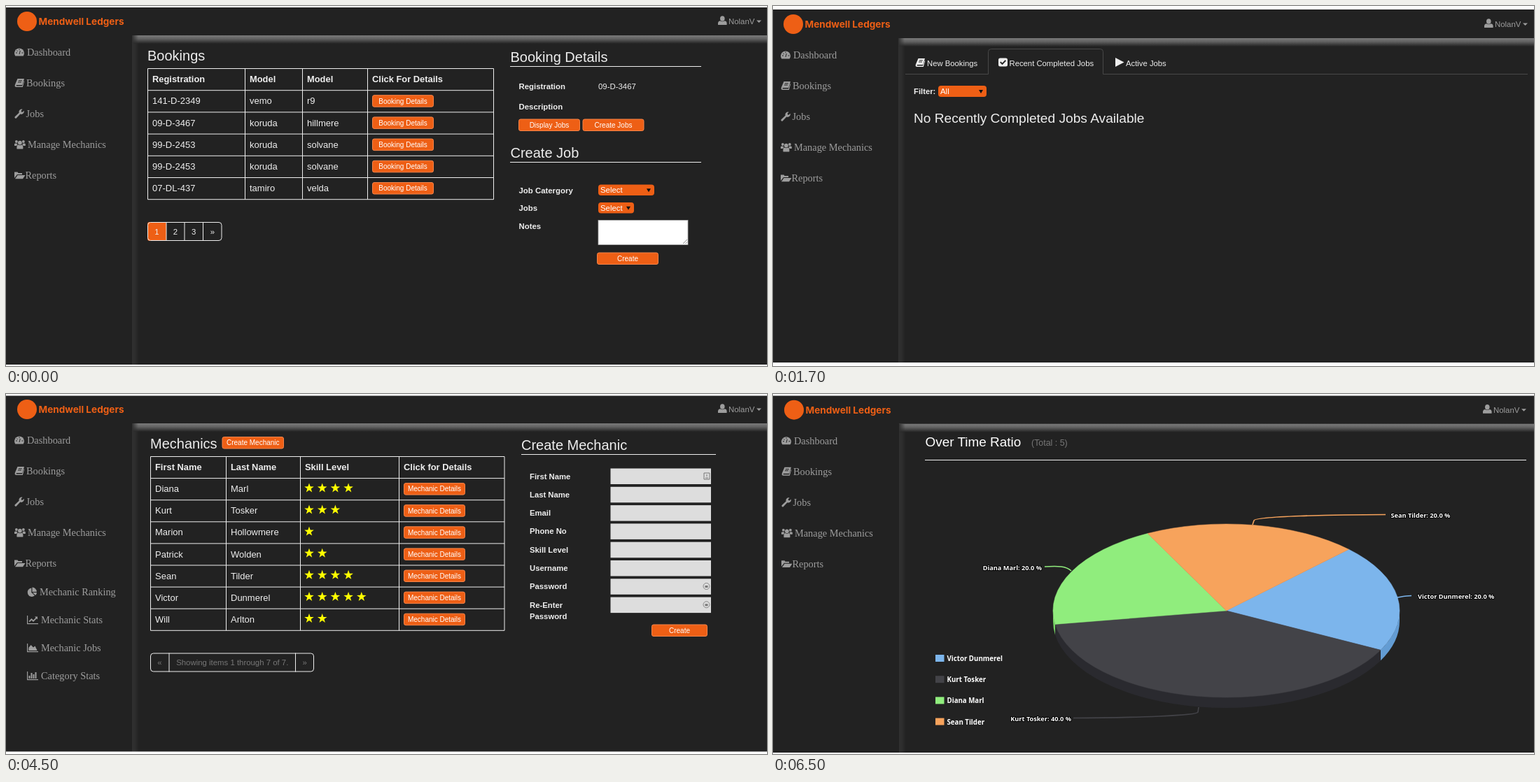
Write an HTML page that moves like this. It is 1087 by 515 pixels and loops after 8 s.

```html
<!DOCTYPE html>
<html lang="en">
<head>
<meta charset="utf-8">
<title>Workshop dashboard</title>
<style>
  html, body { margin: 0; width: 100%; height: 100%; overflow: hidden; background: #222; }
  svg { display: block; width: 1087px; height: 515px; }
  text { font-family: "Liberation Sans", Arial, sans-serif; white-space: pre; }
  .nav { font-family: "Liberation Serif", Times, serif; }
  .brand { font-family: Inter, "Open Sans", sans-serif; font-weight: 700; }
  .chart { font-family: "Open Sans", "Noto Sans", sans-serif; font-weight: 700; }
  .halo { paint-order: stroke; stroke: #000; stroke-width: 2px; stroke-linejoin: round; }
  .b { font-weight: 700; }
</style>
</head>
<body>
<svg id="stage" viewBox="0 0 1087 515" xmlns="http://www.w3.org/2000/svg"></svg>
<script>
const BG = '#222', ORANGE = '#ee5f15', INK = '#eee', GREY = '#9d9d9d', MUTED = '#777';
const stage = document.getElementById('stage');

// y is the middle of the capitals
const text = (x, y, s, size = 13, { fill = INK, cls = '', anchor = 'start' } = {}) =>
  `<text x="${x}" y="${(y + size * 0.36).toFixed(2)}" font-size="${size}" fill="${fill}" class="${cls}" text-anchor="${anchor}">${s}</text>`;
const bold = (x, y, s, size = 12.9) => text(x, y, s, size, { cls: 'b' });
const rect = (x, y, w, h, fill, extra = '') =>
  `<rect x="${x}" y="${y}" width="${w}" height="${h}" fill="${fill}" ${extra}/>`;
const path = (d, fill = 'none', extra = '') => `<path d="${d}" fill="${fill}" ${extra}/>`;
const lines = (d, color = INK, width = 1) => path(d, 'none', `stroke="${color}" stroke-width="${width}"`);
const repeat = (n, fn) => Array.from({ length: n }, (_, i) => fn(i)).join('');

const button = (x, y, w, label, h = 17.5) =>
  rect(x + .5, y + .5, w - 1, h - 1, ORANGE, 'rx="2.5" stroke="#f5854a"') +
  text(x + w / 2, y + h / 2, label, 10, { fill: '#fff', anchor: 'middle' });

const select = (x, y, w, label, h = 15.5) =>
  rect(x, y, w, h, ORANGE, 'rx="4"') +
  text(x + 3, y + h / 2, label, 11.4, { fill: '#fff' }) +
  path(`M${x + w - 11} ${y + h / 2 - 2}h6l-3 5z`, '#111');

// stops are the cell edges; active is the filled cell
function pager(y, h, stops, labels, active, muted = []) {
  const left = stops[0], right = stops[stops.length - 1];
  return (active < 0 ? '' : rect(stops[active], y, stops[active + 1] - stops[active], h, ORANGE, active ? '' : 'rx="3"')) +
    rect(left + .5, y + .5, right - left - 1, h - 1, 'none', `stroke="${INK}" rx="4"`) +
    lines(stops.slice(1, -1).map(x => `M${x} ${y}v${h}`).join('')) +
    labels.map((s, i) => text((stops[i] + stops[i + 1]) / 2, y + h / 2, s, 11.4,
      { anchor: 'middle', fill: muted.includes(i) ? MUTED : INK })).join('');
}

function grid(xs, top, pitch, rows) {
  const right = xs[xs.length - 1], bottom = top + pitch * rows;
  return lines(xs.map(x => `M${x} ${top}V${bottom}`).join('') +
    repeat(rows + 1, i => `M${xs[0]} ${top + pitch * i}H${right}`));
}

function star(cx, cy, r = 7.2) {
  const points = Array.from({ length: 10 }, (_, i) => {
    const a = i * Math.PI / 5, q = i % 2 ? r * .4 : r;
    return `${(cx + q * Math.sin(a)).toFixed(1)},${(cy - q * Math.cos(a)).toFixed(1)}`;
  });
  return `<polygon points="${points.join(' ')}" fill="#ff0"/>`;
}
const stars = (n, x, y, pitch) => repeat(n, i => star(x + i * pitch, y));

// Each icon: filled shape, then strokes cut out of it
const ICONS = {
  gauge: ['M1.3 12.5A7 7 0 1 1 12.7 12.5z', 'M7 10L8.3 5M2 8h2M10.5 8h2M3.3 4.7l1.4 1.2M7 2.5v1.6'],
  book: ['M4.5 1H14L11.2 10H3q-1.2 1 .2 1.6H11L13.7 4 14.3 4.6 11.8 13H3Q0 13 .8 9.8z', 'M5.8 3.8h5M5 6h5'],
  wrench: ['M.8 11.2L6.6 5.8A4 4 0 0 1 11.6 .8L9.6 2.8 10 4.4 11.6 4.8 13.7 2.8A4 4 0 0 1 8.4 7.6L3 13.3A1.5 1.5 0 0 1 .8 11.2z'],
  users: ['M5 4.6a2.9 2.9 0 1 1 5.8 0 2.9 2.9 0 1 1-5.8 0M3.5 13.5Q2.8 8 5.5 7.4 8 9 10.4 7.4 13 8 12.3 13.5zM1 3a1.9 1.9 0 1 1 3.8 0 1.9 1.9 0 1 1-3.8 0M11 3a1.9 1.9 0 1 1 3.8 0 1.9 1.9 0 1 1-3.8 0M0 9V6.3Q1 4.8 4.4 6L3.4 9zM15.8 9V6.3Q14.8 4.8 11.4 6l1 3z'],
  folder: ['M0 11V2.5H4.5L5.6 4H11V6H4zM4.6 7H15.5L12 12.3H1z'],
  user: ['M3 4a3.3 3.8 0 1 1 6.6 0 3.3 3.8 0 1 1-6.6 0M0 13V10Q.5 7.4 3 7.2 6.3 9.4 9.6 7.2 12.3 7.4 12.6 10V13z'],
  pie: ['M6.3 1.5V8L11 12.3A6.2 6.2 0 1 1 6.3 1.5zM7.5 .6A6.4 6.4 0 0 1 13.8 7H7.5zM8 8h6a6 6 0 0 1-1.8 4z'],
  trend: ['M0 1h1.2v11H16v1.2H0zM2.5 9L6.5 5 9 7.5 12.5 4 11 2.6H15V6.5L13.7 5.2 9 10 6.5 7.5 3.8 10.3z'],
  area: ['M0 1h1.2v11H16v1.2H0zM2.4 11V7L5.6 3 9 6.4 11.5 4.6 14.6 11z'],
  bars: ['M0 1h1.2v11H16v1.2H0zM2.5 7h2v4h-2zM5.5 3h2v8h-2zM8.5 5h2v6h-2zM11.5 2h2v9h-2z'],
  check: ['M2.5 1H10.5Q13 1 13 3.5V10.5Q13 13 10.5 13H2.5Q0 13 0 10.5V3.5Q0 1 2.5 1z', 'M2.8 6.6L5.5 9.4 10.3 4.4'],
  play: ['M0 .5L12.5 7 0 13.5z']
};
const icon = (name, x, y, fill = GREY) => {
  const [shape, cut] = ICONS[name];
  return `<g transform="translate(${x} ${y})">${path(shape, fill)}${cut ? lines(cut, BG, name === 'check' ? 2 : 1) : ''}</g>`;
};

const MENU = [
  ['gauge', 'Dashboard', 30], ['book', 'Bookings', 29], ['wrench', 'Jobs', 28.5],
  ['users', 'Manage Mechanics', 31], ['folder', 'Reports', 27.5]
];
const REPORTS = [['pie', 'Mechanic Ranking', 48], ['trend', 'Mechanic Stats', 50], ['area', 'Mechanic Jobs', 50], ['bars', 'Category Stats', 50]];
const navText = (x, y, s) => text(x, y, s, 14.35, { fill: GREY, cls: 'nav' });

// Header, menu and the lit edge of the content pane
function chrome({ dx = 0, dy = 0, userX = 1017, top, bottom, pitch = 44, reports = false }) {
  const paneX = 180 + dx, paneY = 42 + dy;
  return rect(0, 0, 1087, 515, BG) +
    rect(paneX, paneY, 10, 515, 'url(#side)') +
    rect(paneX, paneY, 1087, 12, 'url(#top)') +
    rect(paneX, paneY, 9, 12, 'url(#corner)') +
    `<g transform="translate(${dx} ${dy})">` +
    `<circle cx="30" cy="22" r="14" fill="${ORANGE}"/>` +
    text(46.5, 22, 'Mendwell Ledgers', 13.6, { fill: ORANGE, cls: 'brand' }) +
    MENU.map(([name, label, x], i) => icon(name, 12, 59 + i * pitch) + navText(x, 66 + i * pitch, label)).join('') +
    (reports ? REPORTS.map(([name, label, x], i) => icon(name, 30, 276 + i * 40) + navText(x, 283 + i * 40, label)).join('') : '') +
    '</g>' +
    icon('user', userX, 14 + dy) +
    text(userX + 15, 22 + dy, 'NolanV', 11.4, { fill: GREY }) +
    path(`M${userX + 55} ${20.5 + dy}h7l-3.5 3.6z`, GREY) +
    rect(0, 0, 1087, top, '#fff') + rect(0, bottom, 1087, 515 - bottom, '#fff');
}

const STAFF = [
  ['Diana', 'Marl', 4], ['Kurt', 'Tosker', 3], ['Marion', 'Hollowmere', 1], ['Patrick', 'Wolden', 2],
  ['Sean', 'Tilder', 4], ['Victor', 'Dunmerel', 5], ['Will', 'Arlton', 2]
];
const fullName = i => STAFF[i].slice(0, 2).join(' ');

function bookings() {
  const top = 89.5, pitch = 31.2;
  const rows = [['141-D-2349', 'vemo', 'r9'], ['09-D-3467', 'koruda', 'hillmere'], ['99-D-2453', 'koruda', 'solvane'],
    ['99-D-2453', 'koruda', 'solvane'], ['07-DL-437', 'tamiro', 'velda']];
  const cols = [209, 348, 430, 523];
  return chrome({ top: 2, bottom: 513 }) +
    text(202, 71, 'Bookings', 20) +
    grid([202.5, 341.5, 423.5, 516.5, 696.5], top, pitch, 6) +
    ['Registration', 'Model', 'Model', 'Click For Details'].map((s, i) => bold(cols[i], 104.5, s)).join('') +
    rows.map((row, r) => {
      const y = top + pitch * (r + 1);
      return row.map((s, i) => text(cols[i], y + 15, s)).join('') + button(523, y + 6.5, 88, 'Booking Details');
    }).join('') +
    pager(309, 27, [202, 229, 255, 281.5, 308.5], ['1', '2', '3', '»'], 0) +
    text(720.5, 73, 'Booking Details', 20) + text(720.5, 209.5, 'Create Job', 20) +
    lines('M720 86.5H993M720 223.5H993') +
    [['Registration', 115], ['Description', 143.5], ['Job Catergory', 263.5], ['Jobs', 289], ['Notes', 314.5]]
      .map(([s, y]) => bold(732.5, y, s, 11.4)).join('') +
    text(846, 115, '09-D-3467', 11.4) +
    button(732, 161.5, 88, 'Display Jobs') + button(823.5, 161.5, 88, 'Create Jobs') +
    select(846, 255.5, 80, 'Select') + select(846, 281, 51, 'Select') +
    rect(846, 306.5, 128, 35, '#fff', 'stroke="#aaa" stroke-width=".8"') +
    lines('M967 340l6-6M970.5 340l2.5-2.5', '#777', .8) +
    button(844, 352.5, 88, 'Create');
}

function completed() {
  return chrome({ dx: -1, dy: 4, userX: 1016, top: 5, bottom: 510 }) +
    lines('M189 97.5H307.5V65.5q0-4 4-4H467.5q4 0 4 4V97.5H1078', '#484848') +
    icon('book', 203, 74, INK) + text(220, 81.5, 'New Bookings', 11.3) +
    icon('check', 322, 73.5, INK) + text(337.5, 81.5, 'Recent Completed Jobs', 11.3) +
    icon('play', 489, 73.5, INK) + text(504, 81.5, 'Active Jobs', 11.3) +
    bold(201, 122, 'Filter:', 11.3) + select(236, 114, 69, 'All', 16) +
    text(201, 160, 'No Recently Completed Jobs Available', 19.15);
}

function jobs() {
  const top = 102, pitch = 31.5, cols = [222, 344.5, 439, 524];
  const rows = [['Fix Radiator', '09-D-3467', 4], ['Tyres', '09-D-3467', 2], ['Tyres', '05-DL-1784', 1], ['Tyres', '01-MN-3465', 1],
    ['Tyres', '01-MN-3465', 1], ['New Brake Pads', '07-CN-345', 2, '50'], ['Fix Radiator', '09-D-3467', 3, '22']];
  const roster = [5, 1, 3, 0, 2, 4, 6];
  const rosterY = [229, 260, 292, 323.5, 355, 404, 435.5];
  return chrome({ dx: 1.5, dy: -2, userX: 1014, top: 0, bottom: 515, pitch: 44.3 }) +
    rect(1086, 0, 1, 515, '#fff') +
    text(214, 78, 'Jobs List', 20.3) +
    bold(349, 77, 'Choose Jobs', 11.5) + select(432, 69, 108, 'All Jobs', 16) +
    grid([215.5, 338, 432.5, 517, 566.5], top, pitch, 8) +
    lines(`M682 ${top + pitch}V${top + 8 * pitch}` + repeat(8, i => `M566 ${top + pitch * (i + 1)}H682`)) +
    ['Jobs', 'Car Reg.', 'Difficutly', 'Time'].map((s, i) => bold(cols[i], 117.5, s, 13.1)).join('') +
    rows.map(([job, reg, level, time], r) => {
      const y = top + pitch * (r + 1);
      return text(222, y + 15.5, job) + text(344.5, y + 15.5, reg) +
        repeat(level, i => icon('wrench', 439.5 + i * 16.6, y + 7, '#a5a5a5')) +
        (time ? text(523.5, y + 15.5, time) : button(573, y + 6.5, 89, 'Add Mechanic', 18));
    }).join('') +
    pager(387, 24.5, [215, 246.5, 272.5, 298.5, 324, 350, 375.5, 401.5, 433.5],
      ['««', '«', '1', '2', '3', '4', '»', '»»'], 2, [0, 1]) +
    bold(752, 77, 'Filter', 11.5) + select(786, 69, 90, 'All Mechanics', 16) +
    text(719, 105, "Available mechanics for the job 'Tyres' on car 09-D-3467", 11.53) +
    text(719, 152, 'Mechanics', 20.2) +
    lines([182, 213.5, 245, 276, 307.5, 339.5, 389, 420.5].map(y => `M731 ${y}H1051`).join('')) +
    bold(737.5, 197.5, 'Mechanic', 13) + bold(853, 197.5, 'Skill Level', 13) +
    roster.map((who, i) => {
      const [first, last, skill] = STAFF[who].map(v => typeof v === 'string' ? v.toLowerCase() : v), y = rosterY[i];
      const name = who === 2 ? text(737.5, y, first) + text(737.5, y + 17.5, last)
        : text(737.5, y, `${first}\u00a0\u00a0\u00a0${last}`);
      return name + stars(skill, 858, y - 1, 19) + button(956, y - 9, 89, 'Assign');
    }).join('') +
    pager(484, 24.5, [731, 763, 789, 814.5, 840.5, 872], ['««', '«', '1', '»', '»»'], 2, [0, 1, 3, 4]);
}

function mechanics() {
  const top = 89.5, pitch = 31.1, cols = [213, 321, 427, 568];
  const labels = ['First Name', 'Last Name', 'Email', 'Phone No', 'Skill Level', 'Username', 'Password', 'Re-Enter'];
  return chrome({ top: 2.5, bottom: 511.5, reports: true }) +
    text(206, 71, 'Mechanics', 20) + button(308.5, 61, 88.5, 'Create Mechanic') +
    grid([206.5, 314.5, 420.5, 561.5, 712], top, pitch, 8) +
    ['First Name', 'Last Name', 'Skill Level', 'Click for Details'].map((s, i) => bold(cols[i], 104.5, s)).join('') +
    STAFF.map(([first, last, skill], r) => {
      const y = top + pitch * (r + 1);
      return text(213, y + 15, first) + text(321, y + 15, last) +
        stars(skill, 433, y + 14, 18.7) + button(568, y + 6.5, 88, 'Mechanic Details');
    }).join('') +
    pager(370.5, 27, [206, 233, 413.5, 440], ['«', 'Showing items 1 through 7 of 7.', '»'], -1, [0, 1, 2]) +
    text(736, 72.5, 'Create Mechanic', 20) + lines('M736 86.5H1014') +
    labels.map((s, i) => bold(748, 117.5 + i * 26.3, s, 11.3) + rect(863.5, 106.5 + i * 26.3, 143.5, 22.5, '#ddd')).join('') +
    bold(748, 317.5, 'Password', 11.3) +
    lines('M997 113h8v9h-8zM999 120h4M1001 115v3', '#777') +
    [275, 301.3].map(y => `<circle cx="1000.5" cy="${y}" r="4.5" fill="none" stroke="#888"/>` + rect(998.5, y - 1, 4, 3, '#777')).join('') +
    button(922, 329.5, 80, 'Create');
}

function ratio() {
  const cx = 647.5, cy = 310, rx = 247.5, ry = 124, depth = 15;
  const at = (deg, drop = 0) => {
    const a = deg * Math.PI / 180;
    return `${(cx + rx * Math.cos(a)).toFixed(1)} ${(cy + drop + ry * Math.sin(a)).toFixed(1)}`;
  };
  // staff index, start and end angle, face, side
  const slices = [[5, -45, 27, '#7cb5ec', '#639cd3'], [1, 27, 171, '#434348', '#2a2a2f'],
    [0, 171, 243, '#90ed7d', '#77d464'], [4, 243, 315, '#f7a35c', '#de8a43']];
  const side = ([, a, b, , shade]) => {
    const from = Math.max(a, 0), to = Math.min(b, 180);
    return from >= to ? '' : path(`M${at(from)}A${rx} ${ry} 0 0 1 ${at(to)}L${at(to, depth)}A${rx} ${ry} 0 0 0 ${at(from, depth)}z`, shade);
  };
  const face = ([, a, b, fill]) => path(`M${cx} ${cy}L${at(a)}A${rx} ${ry} 0 0 1 ${at(b)}z`, fill, `stroke="${fill}" stroke-width=".5"`);
  const callouts = [
    [5, '20.0', 921, 290, 'start', 'M912 288.5C905 288.5 898 290 892 291'],
    [1, '40.0', 426, 464.5, 'end', 'M429 463.5C520 463 606 460 607 455L608 448'],
    [0, '20.0', 384, 248.5, 'end', 'M388 247C407 246 419 246 426 253'],
    [4, '20.0', 882.5, 173.5, 'start', 'M875 172.5C800 172.5 688 175 687 181L685 187']
  ];
  return chrome({ dy: .7, userX: 1014, top: 2.5, bottom: 513 }) +
    text(217.5, 68, 'Over Time Ratio', 18.95, { fill: '#fff' }) +
    text(369, 69.5, '(Total : 5)', 12.4, { fill: MUTED }) +
    lines('M217 94.5H1076') +
    slices.map(side).join('') + slices.map(face).join('') +
    callouts.map(([who, share, x, y, anchor, d], i) => lines(d, slices[i][3], 1.6) +
      text(x, y, `${fullName(who)}: ${share} %`, 9.2, { fill: '#fff', cls: 'chart halo', anchor })).join('') +
    slices.map(([who, , , fill], i) => rect(232, 373 + i * 30.2, 12.5, 10, fill) +
      text(248.5, 378.5 + i * 30.2, fullName(who), 9.7, { fill: '#fff', cls: 'chart' })).join('');
}

const gradient = (id, dir, stops) => `<linearGradient id="${id}" x1="0" y1="0" ${dir}="1" ${dir === 'y2' ? 'x2="0"' : 'y2="0"'}>` +
  stops.map(([at, color, alpha = 1]) => `<stop offset="${at}" stop-color="${color}" stop-opacity="${alpha}"/>`).join('') + '</linearGradient>';

const SCENES = [[0, bookings], [500, completed], [2500, jobs], [4500, mechanics], [6500, ratio]];
const LOOP = 8000;

stage.innerHTML = '<defs>' +
  gradient('top', 'y2', [[0, '#7a7a7a'], [.4, '#636363'], [1, BG]]) +
  gradient('side', 'x2', [[0, '#303030'], [.4, '#2e2e2e'], [1, BG]]) +
  gradient('corner', 'x2', [[0, '#303030'], [1, '#303030', 0]]) +
  '</defs>' + SCENES.map(([, draw]) => `<g display="none">${draw()}</g>`).join('');
const groups = [...stage.querySelectorAll(':scope > g')];

function render(ms) {
  const t = ms % LOOP;
  const current = SCENES.filter(([start]) => start <= t).length - 1;
  groups.forEach((g, i) => g.setAttribute('display', i === current ? 'inline' : 'none'));
}

const start = performance.now();
function tick() {
  render(performance.now() - start);
  requestAnimationFrame(tick);
}
tick();
</script>
</body>
</html>
```
